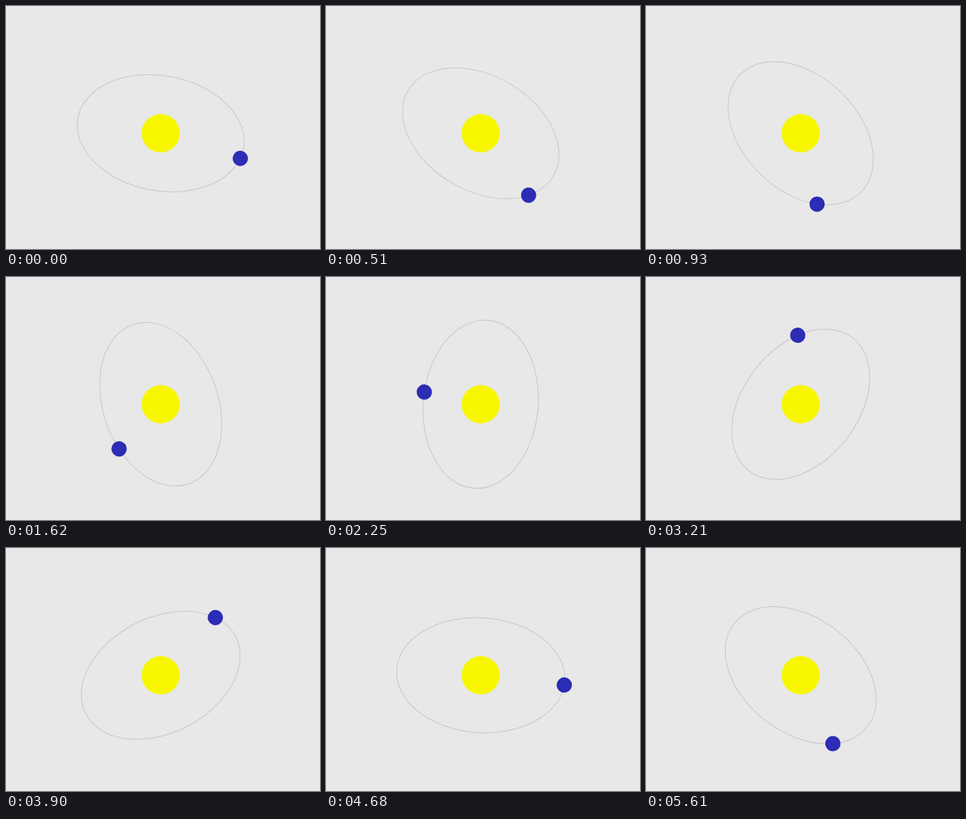
Animation of 410x317 px, one loop 5630 ms. Source, as an HTML page:

```html
<!DOCTYPE html>
<html lang="en">
<head>
<meta charset="utf-8">
<title>Orbit</title>
<style>
  html, body { margin: 0; height: 100%; overflow: hidden; background: #e8e8e8; }
  svg { display: block; }
</style>
</head>
<body>
<svg width="410" height="317" viewBox="0 0 410 317">
  <g transform="translate(202 166)">
    <g id="orbit">
      <ellipse rx="110" ry="75" fill="none" stroke="#c8c8c8"/>
      <circle id="planet" r="10" fill="#2c2cb4"/>
    </g>
    <circle r="25" fill="#f8f700"/>
  </g>
</svg>
<script>
const LOOP = 5630, STEP = 134, LEAD = 30;
const RX = 110, RY = 75;
const START_ANGLE = 10.4, TICK_ANGLE = 2.225, TICKS_PER_STEP = 2.22;
const orbit = document.getElementById('orbit');
const planet = document.getElementById('planet');

// Each step turns by a whole number of ticks: mostly two, sometimes three.
function angleAt(time) {
  const step = Math.floor((time + LEAD) / STEP);
  return START_ANGLE + TICK_ANGLE * Math.round(TICKS_PER_STEP * step - 0.1);
}

function draw(time) {
  const degrees = angleAt(time % LOOP);
  const radians = degrees * Math.PI / 180;
  // The planet travels along the orbit at the same rate as the orbit turns.
  orbit.setAttribute('transform', `rotate(${degrees})`);
  planet.setAttribute('cx', RX * Math.cos(radians));
  planet.setAttribute('cy', RY * Math.sin(radians));
}

let start;
function tick(now) {
  start ??= now;
  draw(Math.max(0, now - start));
  requestAnimationFrame(tick);
}
draw(0);
requestAnimationFrame(tick);
</script>
</body>
</html>
```
